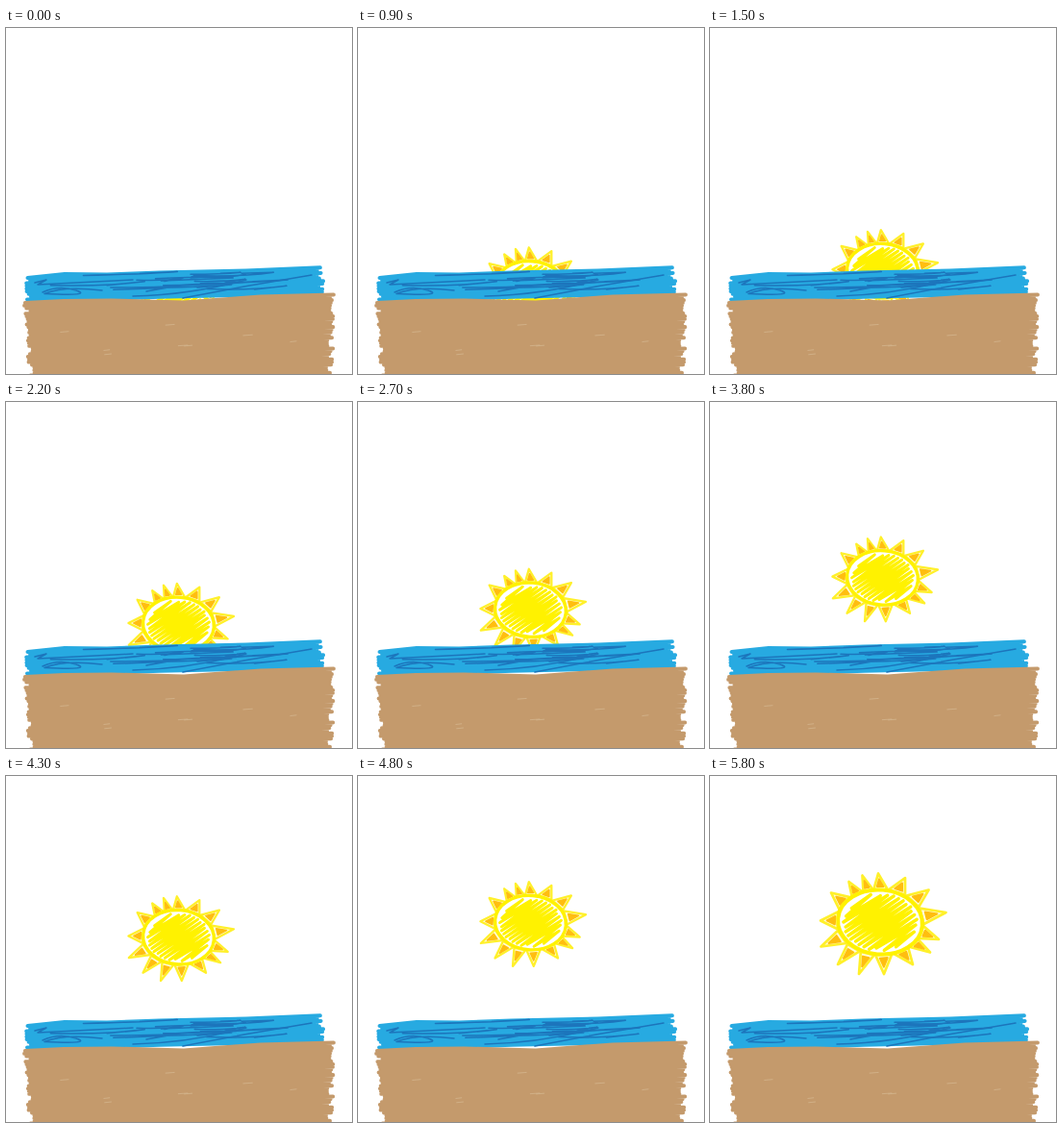
Animation, 360 px wide and 360 px high, one loop 6300 ms. Source, as an HTML page:

```html
<!DOCTYPE html>
<html lang="en">
<head>
<meta charset="utf-8">
<title>Sunrise</title>
<style>
  html, body { margin: 0; width: 100%; height: 100%; overflow: hidden; background: #fff; }
  svg { display: block; width: 100vw; height: 100vh; }
  path, ellipse { stroke-linecap: round; stroke-linejoin: round; }
</style>
</head>
<body>
<svg viewBox="0 0 360 360">
  <g id="sun">
    <g id="rays"></g>
    <ellipse cx="177" cy="152" rx="44" ry="33.5" transform="rotate(5 177 152)" fill="#fff" stroke="#fff200" stroke-width="4"/>
    <path id="scribble" fill="none" stroke="#fff200" stroke-width="3.4"/>
  </g>
  <path id="sea" fill="none" stroke="#27aae1" stroke-width="4"/>
  <g fill="none" stroke="#1c75bc" stroke-width="1.5">
    <path id="ripples"/>
    <path d="M38 275Q55 267 73 273T40 276.500Q60 268 100 273M132 279Q190 278 250 262M184 281Q250 268 318 257M30 265L42 262 33 267 132 262"/>
  </g>
  <path id="sand" fill="none" stroke="#c49a6c" stroke-width="4"/>
  <path id="flecks" fill="none" stroke="#d6b993" stroke-width=".7"/>
</svg>
<script>
const $ = id => document.getElementById(id);
const line = points => 'M' + points.map(p => p.map(v => v.toFixed(1)).join(' ')).join('L');

let seed = 7;
function rand(min, max) {
  seed = seed * 16807 % 2147483647;
  return min + (max - min) * seed / 2147483647;
}
const repeat = (count, make) => Array.from({ length: count }, (_, i) => make(i)).join('');

// Point on the sun's disc; angle in radians, size relative to the ring.
const onDisc = (angle, size = 1) =>
  [177 + 44 * size * Math.cos(angle), 152 + 33.5 * size * Math.sin(angle)];

const tips = [
  [175, 101.5], [203, 106], [227.5, 118.5], [245.5, 142], [238, 170],
  [229, 183.5], [211, 196], [181, 206], [155, 206], [133, 196],
  [115.5, 177.5], [115, 150.5], [126, 121.5], [144.5, 110], [158.5, 103.5]
];
const tipAngle = ([x, y]) => Math.atan2((y - 152) / 33.5, (x - 177) / 44);

// A ray's base reaches most of the way to its neighbours.
function ray(tip, i) {
  const angle = tipAngle(tip);
  const foot = step => {
    const next = tipAngle(tips.at((i + step) % tips.length)) - angle;
    return onDisc(angle + Math.atan2(Math.sin(next), Math.cos(next)) * .46, 1.03);
  };
  return [tip, foot(-1), foot(1)];
}

function shrink(points, s) {
  const mid = [0, 1].map(k => points.reduce((sum, p) => sum + p[k], 0) / 3);
  return points.map(p => p.map((v, k) => mid[k] + (v - mid[k]) * s));
}

$('rays').innerHTML = tips.map(ray).map(r =>
  `<path d="${line(r)}Z" fill="#fffbd8" stroke="#fff02a" stroke-width="2.7"/>` +
  `<path d="${line(shrink(r, .46))}Z" fill="#ffbe10" stroke="#ffbe10" stroke-width="2"/>`
).join('');

// Diagonal zigzag across the disc.
const turns = 27;
$('scribble').setAttribute('d', line(Array.from({ length: turns }, (_, i) => {
  const spread = Math.acos(1 - 2 * (i + .5) / turns);
  return onDisc(-2.3 + (i % 2 ? spread : -spread), rand(.8, .89));
})));

// Stacked strokes under a top edge, with ragged ends that lean by the given amounts.
function band(id, top, height, leanLeft, leanRight) {
  const rows = Math.ceil(height / 2.8);
  $(id).setAttribute('d', repeat(rows, i => line(top.map(([x, y], k) => {
    const end = k === 0 ? leanLeft : k === top.length - 1 ? leanRight : null;
    const shift = end === null ? 0 : end * i / rows + rand(-3.5, 3.5);
    return [x + shift, y + 2 + i * 2.8];
  }))));
}
band('sea', [[22, 258], [61, 254], [105, 254.5], [160, 252.5], [250, 250.5], [324, 247.3]], 28, 2, 6);
band('sand', [[22, 284], [60, 282], [110, 281.5], [185, 283.5], [265, 277.5], [338, 275.5]], 88, 6, -2);

$('ripples').setAttribute('d', repeat(15, i => {
  const x = rand(40, 210), y = 259 + i * 1.2 - x * .02;
  const length = rand(45, 105);
  return `M${x} ${y}q${length * .6} ${rand(-2, 2)} ${length} ${-length * .04}l${-length * .4} ${rand(1, 4)}`;
}));

$('flecks').setAttribute('d', repeat(8, () => `M${rand(50, 310)} ${rand(300, 355)}l${rand(5, 11)} -.7`));

function draw() {
  const t = performance.now() % 6300;
  const step = Math.min(Math.floor(t / 100), 48);
  const scale = t < 5300 ? .84 : t < 5800 ? .915 : 1;
  const x = t < 5300 ? 182 : 180;
  const y = t < 5300 ? 299.7 - 3.03 * step : 154;
  $('sun').setAttribute('transform', `translate(${x} ${y}) scale(${scale}) translate(-180 -154)`);
  requestAnimationFrame(draw);
}
draw();
</script>
</body>
</html>
```
